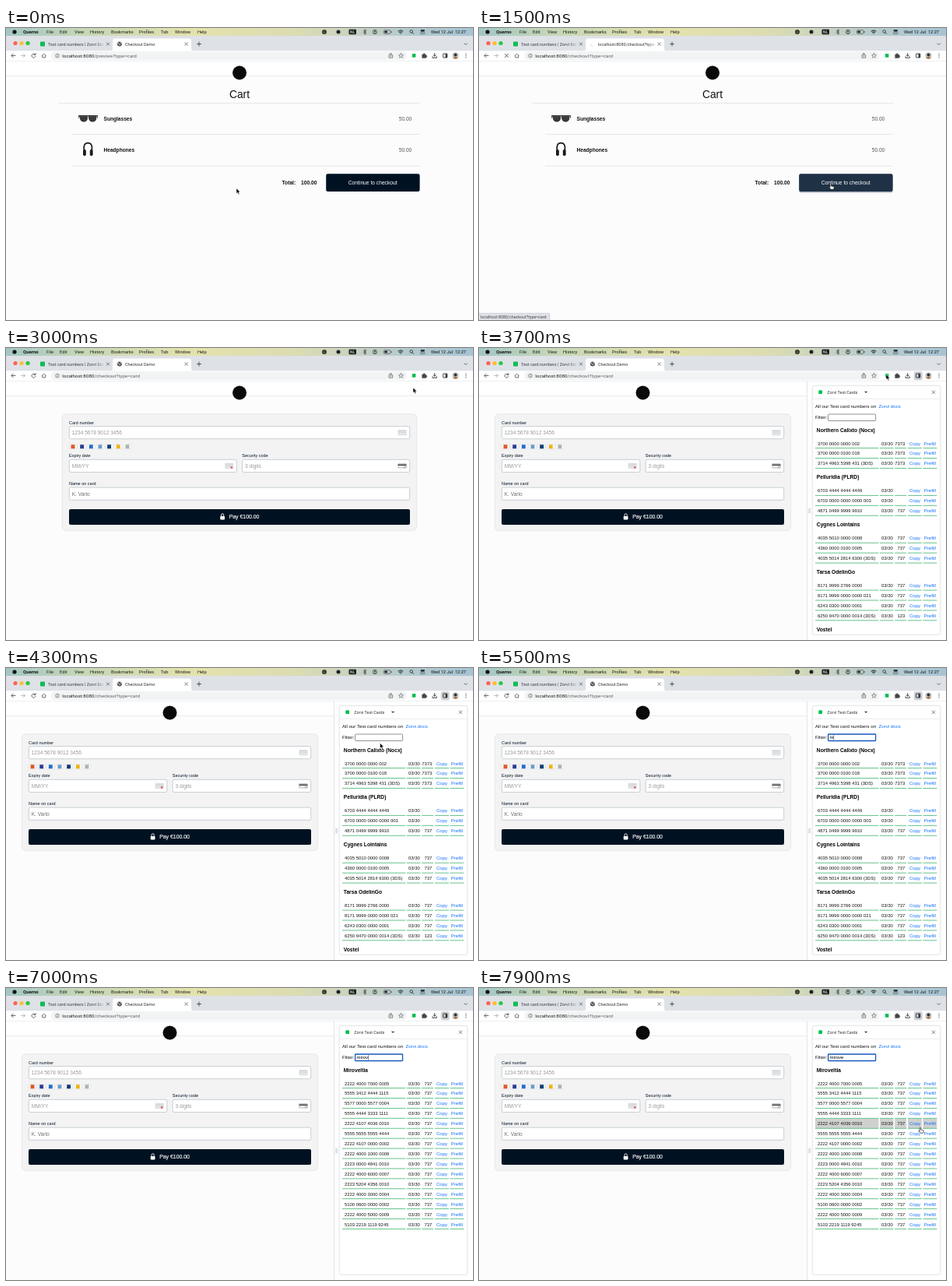
Animation, 600 px wide and 375 px high, one loop 8000 ms. Source, as an HTML page:

```html
<!DOCTYPE html>
<html lang="en">
<head>
<meta charset="utf-8">
<title>Checkout demo</title>
<style>
html, body { margin: 0; width: 100%; height: 100%; overflow: hidden; background: #fff; }
svg { display: block; width: 600px; height: 375px; }
text { font-family: "Liberation Sans", Arial, sans-serif; white-space: pre; }
text.ui { font-family: Roboto, "Open Sans", sans-serif; }
</style>
</head>
<body>
<svg id="stage" viewBox="0 0 600 375" xmlns="http://www.w3.org/2000/svg"></svg>
<script>
const LOOP = 8000, NAVY = '#001222', LINK = '#0d6efd', GREEN = '#0abf53';
const CLICK = 1200, LOADED = 1900, PANEL = 3700, FOCUS = 4700;
const WORD = 'miroveltia';
const KEYS = [5400, 5850, 6250, 6650, 6950, 7150];
const PATH = [
  [0, 296, 206], [200, 296, 206], [850, 451, 200], [2100, 451, 200],
  [2800, 523, 51], [3000, 523, 51], [3250, 523, 34], [3800, 523, 34],
  [4250, 480.5, 96.5], [4400, 480.5, 96.5], [4700, 476, 88],
  [7300, 476, 88], [7800, 566, 179], [8000, 566, 179]
];

// Drawing helpers, all returning SVG markup
const text = (x, y, s, size, fill = '#111', more = '') =>
  `<text x="${x}" y="${y}" font-size="${size}" fill="${fill}" ${more}>${s}</text>`;
const ui = (x, y, s, size, fill, more = '') => text(x, y, s, size, fill, 'class="ui" ' + more);
const rect = (x, y, w, h, fill, r = 0, more = '') =>
  `<rect x="${x}" y="${y}" width="${w}" height="${h}" rx="${r}" fill="${fill}" ${more}/>`;
const dot = (x, y, r, fill, more = '') => `<circle cx="${x}" cy="${y}" r="${r}" fill="${fill}" ${more}/>`;
const path = (d, color = '#444', w = .9, fill = 'none') =>
  `<path d="${d}" stroke="${color}" stroke-width="${w}" fill="${fill}" stroke-linecap="round" stroke-linejoin="round"/>`;
const at = (x, y, s, id = '') => `<g ${id && `id="${id}"`} transform="translate(${x} ${y})">${s}</g>`;
const layer = (id, s) => `<g id="${id}">${s}</g>`;
const BOLD = 'font-weight="700"', MID = 'text-anchor="middle"', END = 'text-anchor="end"';

const cross = (x, y, r = 1.7, w = .7) =>
  path(`M${x - r} ${y - r}l${2 * r} ${2 * r}M${x + r} ${y - r}l${-2 * r} ${2 * r}`, '#444', w);

function menuBar() {
  const items = [[52, 'File'], [69, 'Edit'], [88, 'View'], [108, 'History'], [135, 'Bookmarks'],
    [171, 'Profiles'], [199, 'Tab'], [217, 'Window'], [246, 'Help']];
  return rect(0, 0, 600, 10, 'url(#sky)')
    + dot(11, 5, 2.6, '#111')
    + ui(22, 7.1, 'Querno', 6, '#111', BOLD)
    + items.map(([x, s]) => ui(x, 7.1, s, 5.7, '#1a1a1a')).join('')
    + dot(409, 5, 2.2, 'none', 'stroke="#111" stroke-width="1.3"') + dot(409, 5, 1, '#111')
    + dot(427, 5, 2.5, '#222')
    + rect(440.5, 1.8, 9.5, 6.5, '#1a1a1a', 1.3) + ui(445.2, 7, 'NL', 5, '#fff', MID)
    + path('M459.2 3.3L463 6.7L461 8.2V1.8L463 3.3L459.2 6.7', '#222', .6)
    + dot(474, 5, 2.7, 'none', 'stroke="#222" stroke-width=".6"') + dot(474, 4.2, 1, '#222')
    + path('M472.4 6.8q1.6-2 3.2 0', '#222', .6)
    + rect(485.5, 2.8, 8.5, 4.5, 'none', 1.2, 'stroke="#333" stroke-width=".6"')
    + rect(486.5, 3.8, 3.5, 2.5, '#222', .5) + rect(494.8, 4.2, .8, 1.7, '#333')
    + path('M504 4q3-2.6 6 0M505.2 5.5q1.8-1.5 3.6 0M506.7 7h.6', '#111', .9)
    + dot(520.7, 4.5, 1.8, 'none', 'stroke="#111" stroke-width=".7"') + path('M522.2 6l1.4 1.5', '#111', .7)
    + rect(532.5, 2.3, 5.5, 2.2, '#222', 1.1) + rect(532.5, 5.4, 5.5, 2.2, 'none', 1.1, 'stroke="#222" stroke-width=".5"')
    + ui(546, 7.1, 'Wed 12 Jul  12:27', 5.7, '#111');
}

function tabs() {
  const fade = (x, id) => rect(x, 15, 11, 11, `url(#${id})`);
  return rect(0, 10, 600, 19.5, '#dee1e6')
    + dot(12, 19.5, 2.6, '#ff5f57') + dot(20, 19.5, 2.6, '#febc2e') + dot(28, 19.5, 2.6, '#28c840')
    + rect(44, 17.5, 6, 6, GREEN, .8)
    + `<g clip-path="url(#tab1)">${ui(54, 22.6, 'Test card numbers | Zorvi Docs', 5.5, '#3c4043')}</g>`
    + fade(116, 'fade1') + cross(131, 20.5)
    + path('M134 29.6q3 0 3-3v-10q0-3 3-3h95q3 0 3 3v10q0 3 3 3z', 'none', 0, '#fff')
    + layer('idleTab',
        dot(146, 20.6, 3, '#4a4d51') + path('M144 19.2q1.5.2 1.4 1.4t1.4 1.2M147 18.3q0 1.4 1.6 1.7', '#fff', .8)
        + ui(153, 22.6, 'Checkout Demo', 5.4, '#333'))
    + layer('busyTab',
        at(146, 20.6, path('M0-2.6A2.6 2.6 0 0 1 2.6 0', '#d4d8de', .8), 'spinner')
        + `<g clip-path="url(#tab2)">${ui(153, 22.6, 'localhost:8080/checkout?type=card', 5.4, '#333')}</g>`
        + fade(217, 'fade2'))
    + cross(231.5, 20.5) + path('M248 18v5M245.5 20.5h5', '#333', .8)
    + path('M588.8 19.8l1.8 1.8 1.8-1.8', '#444', .8);
}

function toolbar() {
  return rect(0, 29.5, 600, 13, '#fff')
    + path('M12 35.5h-5M9.2 33.2L6.9 35.5l2.3 2.3', '#555')
    + path('M19.5 35.5h5M22.3 33.2l2.3 2.3-2.3 2.3', '#b4b7ba')
    + layer('reload', path('M37.6 34.2a2.5 2.5 0 1 0 .3 2.3M38 32.5v2h-2', '#555'))
    + layer('stop', cross(35.5, 35.5, 2, .9))
    + path('M46 35.5l2.6-2.4 2.6 2.4M46.8 35.2v2.8h3.6v-2.8', '#555', .8)
    + rect(58, 30.3, 457, 10.8, '#f1f3f4', 5.4)
    + dot(66, 35.6, 2.4, 'none', 'stroke="#555" stroke-width=".6"') + path('M66 35.4v1.5M66 34.2v.1', '#555', .6)
    + '<text class="ui" id="url" x="72.3" y="37.5" font-size="6.25" fill="#5f6368"><tspan fill="#202124">localhost:8080</tspan><tspan id="route"></tspan></text>'
    + path('M492.8 34.6h-.8v3.6h4.6v-3.6h-.8M494.3 36.6v-4.2M493 33.6l1.3-1.3 1.3 1.3', '#555', .7)
    + path('M507.5 32.6l.9 1.9 2.1.2-1.6 1.4.5 2.1-1.9-1.1-1.9 1.1.5-2.1-1.6-1.4 2.1-.2z', '#555', .6)
    + rect(521.8, 33, 4.6, 4.8, GREEN, .7)
    + path('M534.7 34h1.6q-.2-1.4.9-1.4t.9 1.4h1.6v1.5q1.2-.1 1.2 1t-1.2.9v1.2h-5z', '#444', .4, '#444')
    + path('M550.7 32.5v3.6M549.2 34.8l1.5 1.5 1.5-1.5M548 36.8v1.5h5.4v-1.5', '#333', .9)
    + layer('panelKey', rect(558.7, 30.3, 11, 11, '#cdd1d6', 2.2))
    + rect(561.6, 33, 5.2, 5, 'none', .5, 'stroke="#333" stroke-width=".9"') + rect(564.6, 33, 2.2, 5, '#333')
    + dot(577.5, 35.5, 4.2, '#b5cbd3') + path('M574.6 38.6q2.9-3.4 5.8 0q-2.9 2.2-5.8 0z', '#c26a31', .3, '#c26a31')
    + dot(577.5, 34.4, 2, '#3d3028')
    + dot(591, 33.4, .65, '#444') + dot(591, 35.6, .65, '#444') + dot(591, 37.8, .65, '#444');
}

function header(w) {
  return rect(0, 42.5, w, 333, '#fcfcfc') + rect(0, 42.5, w, 19, '#fff')
    + rect(0, 61.3, w, .7, '#e2e4e6') + dot(w / 2, 57.5, 9, '#0a0a0a');
}

function cart() {
  const rule = (x, y) => rect(x, y, 532 - x, .8, '#dfe2e5');
  const item = (y, name) => text(125.5, y, name, 6.6, '#111', BOLD) + text(521.3, y, '50.00', 6.6, '#555', END);
  const lens = x => path(`M${x} 113.4h9.6q.6 6.6-4.4 6.8q-5.6 0-5.2-6.8z`, '#222', .7, '#3a3a3a');
  const ear = x => rect(x, 156, 3.8, 8.3, '#1b1b1d', 1.8);
  return header(600)
    + text(300, 90, 'Cart', 13.8, '#111', MID)
    + rule(68, 96.1) + rule(85, 136.1) + rule(85, 176.8)
    + path('M93.5 112.6h24M94 113.1l-.6 2M117 113.1l.6 2', '#2a2a2a', 1) + lens(95) + lens(106.3)
    + item(118.9, 'Sunglasses')
    + path('M100.3 157.5q-1.4-9.8 5-9.8t5 9.8', '#1b1b1d', 1.7) + ear(99) + ear(107.8)
    + item(159.1, 'Headphones')
    + text(354.5, 200.9, 'Total:', 6.7, '#111', BOLD) + text(399.5, 200.9, '100.00', 6.7, '#111', BOLD + ' ' + END)
    + rect(411.2, 188.6, 120.4, 23, '#aab4c0', 2.5, 'id="glow"')
    + rect(411.2, 187.3, 120.4, 22.6, NAVY, 2.2, 'id="next"')
    + text(471.2, 201, 'Continue to checkout', 6.7, '#fff', MID);
}

function form(w, l, r) {
  const mid = (l + r) / 2;
  const field = (x, y, end, label, hint, color = '#9a9a9a') =>
    text(x, y - 2.7, label, 5.5, NAVY)
    + rect(x + .3, y + .3, end - x - .6, 16.2, '#fff', 2, 'stroke="#b9c4c9" stroke-width=".8"')
    + text(x + 3.7, y + 10.8, hint, 6.6, color);
  const card = (x, y, extra) => rect(x - 15.5, y, 11, 7.2, '#dadcdf', 1.2)
    + rect(x - 14, y + 4.8, 8, .9, '#f2f3f4') + extra;
  const brands = ['#e0582a', '#2a3f94', '#2671c8', '#6f9dc4', '#123f77', '#efb31c', '#a9b5b1'];
  return header(w)
    + rect(l - 8.6, 84.8, r - l + 17.2, 149.8, '#f3f3f4', 5, 'stroke="#e3e4e7" stroke-width=".8"')
    + field(l, 100.2, r, 'Card number', '1234 5678 9012 3456')
    + card(r, 105, '')
    + brands.map((c, i) => {
        const x = l + 11.65 * i;
        return rect(x + .3, 123.6, 9.6, 6.2, '#fff', 1, 'stroke="#d0d3d7" stroke-width=".5"') + rect(x + 2.5, 124.2, 5, 5, c);
      }).join('')
    + field(l, 143, mid - 3.3, 'Expiry date', 'MM/YY')
    + card(mid - 3.3, 147.8, dot(mid - 10.3, 153.4, 1.4, '#e5666a'))
    + field(mid + 3.3, 143, r, 'Security code', '3 digits')
    + rect(r - 15.3, 148.4, 10.6, 5.6, '#e8eaec', 1, 'stroke="#8a8d90" stroke-width=".5"')
    + rect(r - 15.3, 149.5, 10.6, 1.4, '#333') + dot(r - 6.3, 153, 1.3, '#fff', 'stroke="#666" stroke-width=".5"')
    + field(l, 178.8, r, 'Name on card', 'K. Varlo', '#707070')
    + rect(l, 207, r - l, 20, NAVY, 2)
    + rect(mid - 24.8, 216, 5.8, 4.4, '#fff', .8)
    + path(`M${mid - 23.5} 215.8v-1.4a1.6 1.6 0 0 1 3.2 0v1.4`, '#fff', .9)
    + text(mid - 13.3, 219.4, 'Pay €100.00', 6.9, '#fff', 'stroke="#fff" stroke-width=".15"');
}

const title = (y, s) => text(433.8, y + 2.6, s, 6.7, '#000', BOLD);
const CELLS = [[432, 81.5], [515, 17.5], [534.2, 15], [551, 18], [570.4, 18]];
function row(y, num, code = '', id = '') {
  const cells = (dy, h, fill) => CELLS.map(([x, w]) => rect(x, y + dy, w, h, fill)).join('');
  return (id && `<g id="${id}">${cells(-6.2, 12.3, '#cfd1cf')}</g>`)
    + text(435, y + 2, num, 5.9) + text(517, y + 2, '03/30', 5.95) + text(547.3, y + 2, code, 5.9, '#111', END)
    + text(553, y + 2, 'Copy', 6, LINK) + text(571.8, y + 2, 'Prefill', 6, LINK)
    + cells(5.6, .8, '#41b470');
}

const GROUPS = [
  ['Northern Calixto (Nocx)', '3700 0000 0000 002:7373', '3700 0000 0100 018:7373', '3714 4963 5398 431 (3DS):7373'],
  ['Pelluridia (PLRD)', '6703 4444 4444 4449', '6703 0000 0000 0000 003', '4871 0499 9999 9910:737'],
  ['Cygnes Lointains', '4035 5010 0000 0008:737', '4360 0000 0100 0005:737', '4035 5014 2814 6300 (3DS):737'],
  ['Tarsa OdelinGo', '8171 9999 2766 0000:737', '8171 9999 0000 0000 021:737', '6243 0300 0000 0001:737', '6250 9470 0000 0014 (3DS):123'],
  ['Vostel']
];
const MATCHES = ['2222 4000 7000 0005', '5555 3412 4444 1115', '5577 0000 5577 0004', '5555 4444 3333 1111',
  '2222 4107 4036 0010', '5555 5555 5555 4444', '2222 4107 0000 0002', '2222 4000 1000 0008',
  '2223 0000 4841 0010', '2222 4000 6000 0007', '2223 5204 4356 0010', '2222 4000 3000 0004',
  '5100 0600 0000 0002', '2222 4000 5000 0009', '5103 2219 1119 9245'];
const PITCH = 12.93, FIRST = 122.5;

function allCards() {
  let y = 105, out = '';
  for (const [name, ...rows] of GROUPS) {
    out += title(y, name);
    rows.forEach((s, i) => out += row(y + 17.5 + i * PITCH, ...s.split(':')));
    y += 35 + (rows.length - 1) * PITCH;
  }
  return out;
}

function panel() {
  return rect(421, 42.5, 179, 333, '#fff') + rect(421, 42.5, .8, 333, '#dadce0')
    + rect(423, 205.5, 3.2, 7, '#dfe1e5', 1)
    + rect(428.2, 48.3, 164.6, 320, '#fff', 2, 'stroke="#dadce0" stroke-width=".8"')
    + rect(428.5, 64.8, 164, .7, '#dfe1e5')
    + rect(436.3, 54.2, 4.8, 4.8, GREEN, .7)
    + ui(447.3, 58.8, 'Zorvi Test Cards', 5.4, '#333')
    + path('M495.5 56l1.6 1.8 1.6-1.8z', '#333', .3, '#333') + cross(584, 56.7)
    + text(432, 77.4, 'All our Test card numbers on', 6.15) + text(513.5, 77.4, 'Zorvi docs', 6.15, LINK)
    + text(432, 91.4, 'Filter:', 6.15)
    + rect(448.6, 85, 61, 8.5, '#fff', .8, 'id="field" stroke-width=".8"')
    + text(450.4, 91.2, '', 6, '#000', 'id="typed"') + rect(450.4, 86.3, .5, 6, '#000', 0, 'id="caret"')
    + layer('all', allCards())
    + layer('found', title(105, 'Miroveltia') + MATCHES.map((n, i) => row(FIRST + i * PITCH, n, '737', 'hover' + i)).join(''));
}

const ramp = (id, color) => `<linearGradient id="${id}"><stop stop-color="${color}" stop-opacity="0"/><stop offset="1" stop-color="${color}"/></linearGradient>`;
const clip = (id, x, w) => `<clipPath id="${id}">${rect(x, 12, w, 17, '#000')}</clipPath>`;

document.getElementById('stage').innerHTML =
  `<defs><linearGradient id="sky"><stop stop-color="#a3c6c4"/><stop offset=".15" stop-color="#c3d6b6"/>
   <stop offset=".4" stop-color="#e4e2ac"/><stop offset=".62" stop-color="#dcdcb2"/>
   <stop offset=".85" stop-color="#b5cbcd"/><stop offset="1" stop-color="#a6c4d4"/></linearGradient>
   ${ramp('fade1', '#dee1e6')}${ramp('fade2', '#fff')}${clip('tab1', 54, 73)}${clip('tab2', 153, 75)}</defs>`
  + layer('cart', cart()) + layer('wide', form(600, 81, 519))
  + layer('narrow', form(421, 29, 392) + panel())
  + layer('status', path('M-1 366.3H89q2 0 2 2V376H-1z', '#c4c7cb', .6, '#dee1e6')
      + ui(2, 372.7, 'localhost:8080/checkout?type=card', 5.3, '#444'))
  + menuBar() + tabs() + toolbar() + rect(0, 42.2, 600, .5, '#dcdfe2')
  + at(0, 0,
      layer('arrow', path('M0 0v6.6l1.6-1.4 1.1 2.5 1.2-.5-1.1-2.4h2z', '#fff', .5, '#000'))
      + layer('hand', path('M0 .6q.7-1 1.4 0v2.3l3.2.7q.8.3.6 1.3l-.5 2.3H1.1L-1.3 4.6q.2-.9 1.3-.1z', '#000', .6, '#fff'))
      + layer('beam', path('M-1 -1q1 0 1 1v5q0 1-1 1M1-1q-1 0-1 1v5q0 1 1 1', '#222', .6)), 'cursor');

const el = id => document.getElementById(id);
const show = (id, on) => el(id).setAttribute('display', on ? 'inline' : 'none');

function cursorAt(t) {
  const i = Math.max(1, PATH.findIndex(p => p[0] > t));
  const [t0, x0, y0] = PATH[i - 1], [t1, x1, y1] = PATH[i];
  const k = (t - t0) / (t1 - t0), e = k * k * (3 - 2 * k);
  return [x0 + (x1 - x0) * e, y0 + (y1 - y0) * e];
}

function draw(t) {
  const [x, y] = cursorAt(t);
  const inside = (l, top, r, b) => x >= l && x <= r && y >= top && y <= b;
  const busy = t >= CLICK && t < LOADED, open = t >= PANEL;
  const typed = WORD.slice(0, KEYS.filter(k => k <= t).length);
  const filtered = typed.length > 1, focused = t >= FOCUS;
  const onButton = t < LOADED && inside(411, 187, 531, 210);

  show('cart', t < LOADED);
  show('wide', t >= LOADED && !open);
  show('narrow', open);
  show('panelKey', open);
  show('status', t >= 1000 && t < LOADED);
  show('idleTab', !busy);
  show('busyTab', busy);
  show('reload', !busy);
  show('stop', busy);
  el('spinner').setAttribute('transform', `translate(146 20.6) rotate(${-t * .36})`);
  el('route').textContent = t < CLICK ? '/preview?type=card' : '/checkout?type=card';
  el('next').setAttribute('fill', onButton ? '#1f3145' : NAVY);
  show('glow', onButton);

  el('field').setAttribute('stroke', focused ? '#1459c4' : '#767676');
  el('field').setAttribute('stroke-width', focused ? 1.3 : .8);
  el('typed').textContent = typed;
  const last = KEYS[typed.length - 1] || FOCUS;
  show('caret', focused && (t - last) % 1000 < 500);
  el('caret').setAttribute('x', 450.6 + (typed ? el('typed').getComputedTextLength() : 0));
  show('all', !filtered);
  show('found', filtered);

  const visible = t < KEYS[0] || t >= 7300;
  const over = visible && filtered ? Math.round((y - FIRST) / PITCH) : -1;
  MATCHES.forEach((_, i) => show('hover' + i, i === over));
  const hand = onButton || (over >= 0 && (inside(553, 116, 568, 310) || inside(571, 116, 588, 310)));
  const beam = open && inside(449, 84, 510, 94);
  show('cursor', visible);
  show('hand', hand);
  show('beam', beam);
  show('arrow', !hand && !beam);
  el('cursor').setAttribute('transform', `translate(${x} ${y})`);
}

const start = performance.now();
function tick() {
  draw((performance.now() - start) % LOOP);
  requestAnimationFrame(tick);
}
tick();
</script>
</body>
</html>
```
